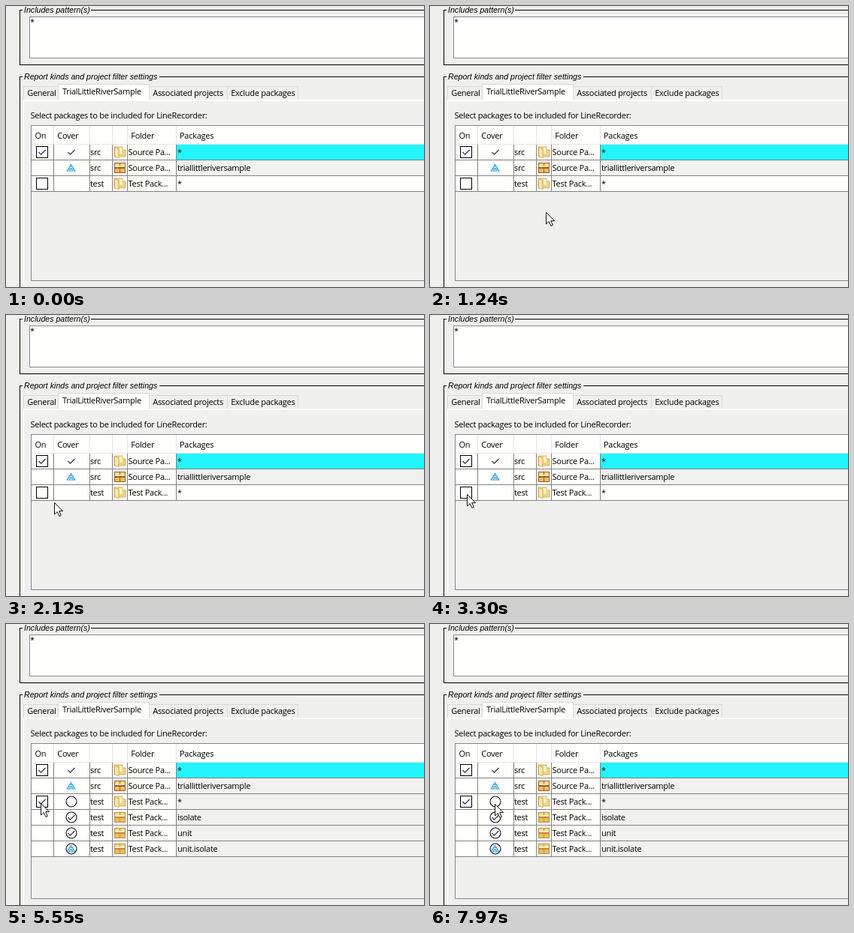
Write an HTML page that moves like this. It is 556 px wide and 375 px high and loops after 8 s.

```html
<!DOCTYPE html>
<html lang="en">
<head>
<meta charset="utf-8">
<title>Package filter settings</title>
<style>
  html, body { margin: 0; width: 100%; height: 100%; overflow: hidden; background: #f0f0ef; }
  svg { display: block; }
  text { font: 11px "Open Sans", "Noto Sans", sans-serif; letter-spacing: -.27px; fill: #000; white-space: pre; }
  .legend { font: italic 10.6px "Liberation Sans", Arial, sans-serif; letter-spacing: 0; }
  rect { shape-rendering: crispEdges; }
</style>
</head>
<body>
<svg id="stage" width="556" height="375" viewBox="0 0 556 375">
  <defs>
    <g id="tick"><path d="M-4.5 0 L-1.5 3.2 L4.5 -3" fill="none" stroke="#2a2a48" stroke-width="1.1"/></g>
    <g id="box">
      <rect x="-8" y="-8" width="16" height="16" fill="#000"/>
      <rect x="-7" y="-7" width="14" height="14" fill="#fff"/>
    </g>
    <g id="ring"><circle r="7" fill="#fff" stroke="#111" stroke-width="1.1"/></g>
    <g id="triangle" fill="none" stroke="#1b98e6">
      <path d="M-.5 -4.5 L4.7 4 H-5.7 Z" fill="#fff" stroke-width="1.1"/>
      <path d="M-2 -1.5 H1 M-3.5 1.3 H2.5 M-3 4 L-.5 0 L2 4" stroke-width=".9"/>
    </g>
    <g id="folder" stroke-linejoin="round">
      <path d="M-7 -7 H4 V-3 H8 V6 H-7 Z" fill="#f0d288" stroke="#cda24a" stroke-width=".8"/>
      <path d="M-6.5 -6.5 L-1 -4 V8 L-6.5 5.5 Z" fill="#f9e6ae" stroke="#cda24a" stroke-width=".8"/>
      <path d="M0 -6 H3.5 V2 H0 Z" fill="#fff3cb"/>
    </g>
    <g id="package">
      <rect x="-7" y="-7" width="15" height="14" fill="currentColor"/>
      <rect x="-6" y="-6" width="6" height="5" fill="#f5d890"/>
      <rect x="1" y="-6" width="6" height="5" fill="#f5d890"/>
      <rect x="-6" y="1" width="6" height="5" fill="#e9bd62"/>
      <rect x="1" y="1" width="6" height="5" fill="#e9bd62"/>
      <rect x="-6" y="-3" width="13" height="2" fill="#fff0c2"/>
    </g>
  </defs>
  <g id="panel"></g>
  <g id="rows"></g>
  <g id="extraRows"></g>
  <path id="cursor" d="M.5 .5 V16 L4.2 12.6 L7 18.5 L9.4 17.4 L6.7 11.7 H11.6 Z" fill="#fff" stroke="#111" stroke-width="1"/>
</svg>
<script>
const LOOP = 8000, CHECK_AT = 4480, EXPAND_AT = 4540;
const WHITE = '#fffffe', GRAY = '#f1f1f0', GRID = '#828282', LINE = '#000', PALE = '#e5e5e5';
const COLUMNS = [63, 111, 141, 161, 226];
const $ = id => document.getElementById(id);

const rect = (x, y, w, h, fill) => `<rect x="${x}" y="${y}" width="${w}" height="${h}" fill="${fill}"/>`;
const frame = (x, y, w, h, line, fill) => rect(x, y, w, h, line) + rect(x + 1, y + 1, w - 2, h - 2, fill);
const label = (x, y, text, cls = '') => `<text x="${x}" y="${y}" class="${cls}">${text}</text>`;
const icon = (name, x, y, color = '#000') => `<use href="#${name}" x="${x}" y="${y}" color="${color}"/>`;

function group(y, h, baseline, title, lineStart) {
  return rect(18, y, 1, h, LINE) + rect(18, y, 4, 1, LINE) +
    rect(lineStart, y, 556 - lineStart, 1, LINE) + label(24, baseline, title, 'legend');
}

function tab(x, w, title, selected) {
  const y = selected ? 104 : 107;
  return frame(x, y, w + 1, 126 - y, '#d9d9d9', selected ? WHITE : '#f0f0ef') +
    label(x + (selected ? 6 : 5.2), selected ? 118 : 120, title);
}

function drawPanel() {
  const headers = [[38.5, 'On'], [68.3, 'Cover'], [166.3, 'Folder'], [231, 'Packages']];
  return group(5, 74, 9, 'Includes pattern(s)', 113) + rect(18, 78, 538, 1, LINE) +
    frame(31, 14, 540, 56, '#858991', WHITE) + label(32, 25, '*') +
    group(94, 281, 98, 'Report kinds and project filter settings', 204) +
    tab(23, 46, 'General') + tab(190, 104, 'Associated projects') +
    tab(294, 94, 'Exclude packages') + tab(69, 121, 'TrialLittleRiverSample', true) +
    rect(23, 125, 533, 2, WHITE) + rect(23, 125, 1, 250, WHITE) +
    label(32.5, 150, 'Select packages to be included for LineRecorder:') +
    frame(33, 159, 540, 208, '#828790', '#f0f0ef') + rect(34, 160, 522, 24, WHITE) +
    COLUMNS.map(x => rect(x, 160, 1, 24, PALE)).join('') +
    rect(34, 184, 522, 1, PALE) +
    headers.map(([x, text]) => label(x, 177, text)).join('');
}

function row(index, { on = [], cover = [], kind, folder, pack, name, fill, tone }) {
  const y = 185 + index * 21, mid = y + 10;
  return rect(34, y, 192, 20, WHITE) + rect(227, y, 329, 20, fill) +
    rect(34, y + 20, 522, 1, GRID) +
    COLUMNS.map(x => rect(x, y, 1, 20, GRID)).join('') +
    on.map(n => icon(n, 48, mid)).join('') +
    cover.map(n => icon(n, 87, mid)).join('') +
    label(112, y + 14, kind) + icon(pack, 151, mid, tone) +
    label(162.5, y + 14, folder) + label(228, y + 14, name);
}

const source = { kind: 'src', folder: 'Source Pa...' };
const test = { kind: 'test', folder: 'Test Pack...', fill: GRAY, pack: 'package', tone: '#bd8b38' };

$('panel').innerHTML = drawPanel();
$('rows').innerHTML =
  row(0, { ...source, on: ['box', 'tick'], cover: ['tick'], pack: 'folder', name: '*', fill: '#22f5ff' }) +
  row(1, { ...source, cover: ['triangle'], pack: 'package', name: 'triallittleriversample', fill: GRAY, tone: '#a45a20' });

function drawTestRows(checked, expanded) {
  let html = row(2, {
    ...test, pack: 'folder', name: '*', fill: expanded ? GRAY : WHITE,
    on: checked ? ['box', 'tick'] : ['box'], cover: expanded ? ['ring'] : []
  });
  if (expanded) {
    html += row(3, { ...test, cover: ['ring', 'tick'], name: 'isolate' }) +
      row(4, { ...test, cover: ['ring', 'tick'], name: 'unit' }) +
      row(5, { ...test, cover: ['ring', 'triangle'], name: 'unit.isolate' });
  }
  return html;
}

// Pointer moves: first step, last step, step count, destination, easing power
const MOVES = [
  [630, 630, 1, 411, 365, 1],
  [700, 860, 3, 255, 310, 1],
  [930, 1430, 7, 115, 261, 1.5],
  [1500, 1580, 2, 97, 255, 1],
  [1650, 2120, 6, 64, 250, 1.5],
  [2430, 2810, 6, 52, 239, 1],
  [3060, 3060, 1, 50, 239, 1],
  [3300, 3300, 1, 49, 239, 1],
  [5550, 5550, 1, 46, 239, 1],
  [5620, 5620, 1, 45, 239, 1],
  [6320, 6650, 5, 86, 243, 1.3],
  [7900, 7970, 2, 86, 240, 1]
];

function pointerAt(time) {
  let pos = null;
  for (const [start, end, steps, x, y, power] of MOVES) {
    if (time < start) break;
    const done = steps === 1 ? 1
      : Math.min(steps, 1 + Math.floor((time - start) * (steps - 1) / (end - start) + 1e-6));
    const k = 1 - (1 - done / steps) ** power;
    const from = pos || [x, y];
    pos = [from[0] + (x - from[0]) * k, from[1] + (y - from[1]) * k].map(Math.round);
  }
  return pos;
}

let shownState = '';
function render(time) {
  const checked = time >= CHECK_AT, expanded = time >= EXPAND_AT;
  const state = `${checked}${expanded}`;
  if (state !== shownState) {
    $('extraRows').innerHTML = drawTestRows(checked, expanded);
    shownState = state;
  }
  const pos = pointerAt(time);
  $('cursor').setAttribute('visibility', pos ? 'visible' : 'hidden');
  if (pos) $('cursor').setAttribute('transform', `translate(${pos})`);
}

const began = performance.now();
function animate() {
  render((performance.now() - began) % LOOP);
  requestAnimationFrame(animate);
}
animate();
</script>
</body>
</html>
```
